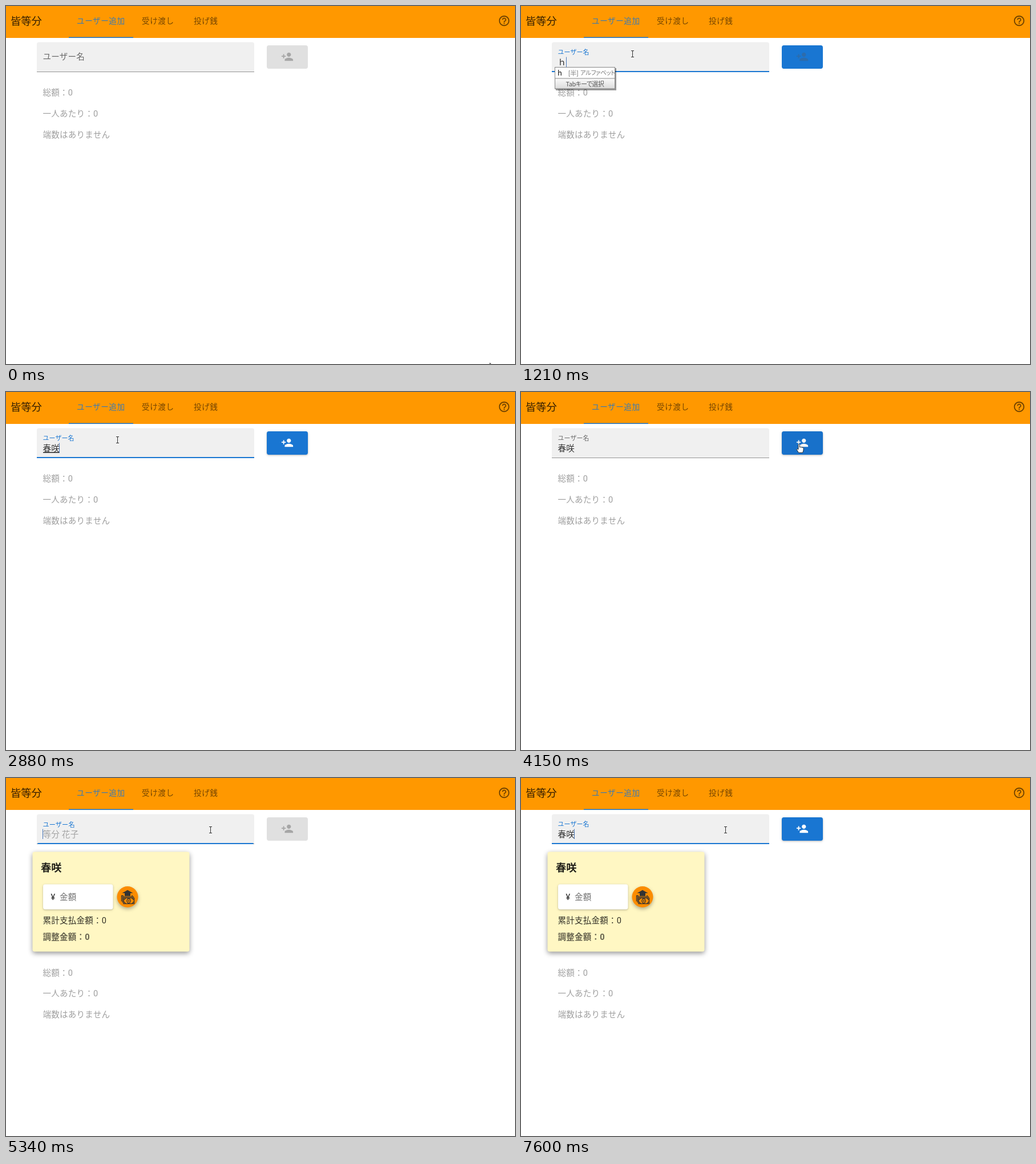
Write an HTML page that moves like this. It is 892 px wide and 628 px high and loops after 7990 ms.

```html
<!DOCTYPE html>
<html lang="ja">
<head>
<meta charset="utf-8">
<title>割り勘アプリ</title>
<style>
html, body { margin: 0; width: 100%; height: 100%; overflow: hidden; background: #fff; }
svg { display: block; width: 892px; height: 628px; }
text { font-family: Roboto, "Noto Sans CJK JP", "Noto Sans CJK", sans-serif; white-space: pre; }
.cjk { font-family: "Noto Sans CJK JP", "Noto Sans CJK", sans-serif; }
.tight { font-feature-settings: "palt"; letter-spacing: -.4px; }
.low { filter: drop-shadow(0 1.5px 1px rgba(0,0,0,.16)) drop-shadow(0 1px 2px rgba(0,0,0,.14)); }
.mid { filter: drop-shadow(0 3px 3px rgba(0,0,0,.3)); }
.high { filter: drop-shadow(0 3px 4px rgba(0,0,0,.42)); }
</style>
</head>
<body>
<svg id="stage" viewBox="0 0 892 628"></svg>
<script>
const LOOP = 7990;
const BLUE = '#1976d2';
const NAME = '春咲';
const FOCUS1 = 800, PRESS = 4150, ADD = 4380, ICON = 4540, FOCUS2 = 5130;

// Typing: time, text, suggestion popup, underline
const typing = [
  [0, ''],
  [1150, 'ｈ', 'letter'], [1340, 'は'], [1680, 'はｒ'], [1750, 'はる', 'two'],
  [2080, 'はるｓ', 'two'], [2150, 'はるさ', 'one'], [2550, 'はるさき', 'one'],
  [2880, NAME, '', true], [3150, NAME], [ADD, ''],
  [5530, 'ｈ', 'letter'], [5660, 'は'], [6140, 'はる', 'two'],
  [6540, 'はるｓ', 'two'], [6600, 'はるさ', 'one'], [6800, 'はるさｋ', 'one'],
  [6930, 'はるさき', 'one'], [7000, NAME, '', true], [7530, NAME]
];

// Pointer moves: start, end, from, to
const moves = [
  [60, 770, [848, 626], [195, 84]],
  [3520, 4010, [195, 84], [486, 91]],
  [4900, 5110, [486, 91], [358, 91]]
];

const text = (x, cy, str, size, fill, more = '') =>
  `<text x="${x}" y="${(cy + size * .38).toFixed(2)}" font-size="${size}" fill="${fill}" ${more}>${str}</text>`;
const body = (x, cy, str, fill, more = '') =>
  text(x, cy, str, 14.56, fill, `letter-spacing=".22" ${more}`);
const rect = (x, y, w, h, fill, more = '') =>
  `<rect x="${x}" y="${y}" width="${w}" height="${h}" fill="${fill}" ${more}/>`;
const tab = (x, str, fill) => text(x, 26, str, 13.6, fill, 'letter-spacing=".54"');

const HELP = 'M11 18h2v-2h-2v2zm1-16C6.48 2 2 6.48 2 12s4.48 10 10 10 10-4.48 10-10S17.52 2 12 2zm0 18c-4.41 0-8-3.59-8-8s3.59-8 8-8 8 3.59 8 8-3.59 8-8 8zm0-14c-2.21 0-4 1.79-4 4h2c0-1.1.9-2 2-2s2 .9 2 2c0 2-3 1.75-3 5h2c0-2.25 3-2.5 3-5 0-2.21-1.79-4-4-4z';
const PERSON = 'M15 12c2.21 0 4-1.79 4-4s-1.79-4-4-4-4 1.79-4 4 1.79 4 4 4zm-9-2V7H4v3H1v2h3v3h2v-3h3v-2H6zm9 4c-2.67 0-8 1.34-8 4v2h16v-2c0-2.66-5.33-4-8-4z';
const person = (id, fill) =>
  `<path id="${id}" d="${PERSON}" fill="${fill}" transform="translate(482 78) scale(.917)"/>`;
const button = (fill, more) => rect(457, 69, 72, 41, fill, `rx="3.7" ${more}`);

const money = `<g id="money" fill="none" stroke="#333" stroke-width="1.3">
  <path d="M203.500 202L213 196.500L222.500 202H218V207H208V202Z" fill="#333" stroke="none"/>
  <path d="M202.500 216.500V206.500H206M220 206.500H222M204.500 218.500V208.500H224"/>
  <rect x="206" y="210.500" width="18.500" height="10"/>
  <ellipse cx="215" cy="215.500" rx="3" ry="4"/>
  <path d="M215 213.500v4M206.500 214l3-3M224 217l-3 3M206.500 217l3 3M224 214l-3-3"/></g>`;

const stage = document.getElementById('stage');
stage.innerHTML = `
  <defs>
    <linearGradient id="foot" x2="0" y2="1"><stop stop-color="#fafafa"/><stop offset="1" stop-color="#dcdcdc"/></linearGradient>
    <clipPath id="clip">${button('#000', '')}</clipPath>
  </defs>
  ${rect(0, 0, 892, 56, '#ff9800')}
  ${text(8, 26, '皆等分', 18.3, 'rgba(0,0,0,.8)')}
  ${tab(124, 'ユーザー追加', 'rgba(25,118,210,.85)')}
  ${tab(238, '受け渡し', 'rgba(0,0,0,.54)')}
  ${tab(329, '投げ銭', 'rgba(0,0,0,.54)')}
  ${rect(110, 54.5, 113, 1.5, BLUE)}
  <path d="${HELP}" fill="rgba(0,0,0,.56)" transform="translate(862 15) scale(.917)"/>
  <path d="M54 115.500V67.200q0-3.700 3.700-3.700H431.300q3.700 0 3.700 3.700V115.500Z" fill="#f0f0f0"/>
  ${rect(54, 115, 381, 1, '#949494')}
  ${rect(54, 114, 381, 2, BLUE, 'id="bar"')}
  <text id="label" font-size="14.56" letter-spacing=".22">ユーザー名</text>
  ${body(64.5, 98, '等分 花子', '#000', 'id="hint"')}
  ${body(64.5, 98, '', 'rgba(0,0,0,.8)', 'id="value" class="cjk"')}
  ${rect(65, 105.3, 29, 1.5, '#222', 'id="under"')}
  ${rect(0, 89.5, 1, 17.5, '#4a78b8', 'id="caret"')}
  ${button('#e0e0e0', 'id="low" class="low"')}
  ${button('#e0e0e0', 'id="high" class="high"')}
  ${button('#e0e0e0', 'id="face"')}
  ${person('dim', '#000')}${person('lit', '#fff')}
  ${button('#000', 'id="shade"')}
  <g clip-path="url(#clip)"><circle id="ripple" cx="486" cy="91" fill="#fff"/></g>
  <g id="card">
    ${rect(46.5, 129.5, 275, 175, '#fff7c3', 'rx="3.7" class="high"')}
    ${text(61, 157, NAME, 18.3, 'rgba(0,0,0,.87)', 'font-weight="700"')}
    ${rect(65, 186.5, 122.5, 44, '#fff', 'rx="3.7" class="low"')}
    ${body(78.5, 208.8, '¥', 'rgba(0,0,0,.87)')}
    ${body(78, 208.8, '金額', 'rgba(0,0,0,.56)', 'id="amount"')}
    <circle cx="213" cy="208.500" r="18.500" fill="#fb8c00" class="mid"/>
    ${money}
    ${body(64.5, 249, '累計支払金額：0', 'rgba(0,0,0,.8)')}
    ${body(64.5, 278.5, '調整金額：0', 'rgba(0,0,0,.6)', 'font-weight="700"')}
  </g>
  <g id="totals">${['総額：0', '一人あたり：0', '端数はありません']
    .map((s, i) => body(64.5, 151.7 + 36.7 * i, s, 'rgba(0,0,0,.38)')).join('')}</g>
  <g id="popup"></g>
  <path id="arrow" d="M0 0V12L2.800 9.500L4.700 13.700L6.500 12.900L4.700 8.800H8.500Z" fill="#fff" stroke="#222" stroke-width=".9"/>
  <path id="beam" d="M-2 -5.500H3M-2 5.500H3M.5 -5.500V5.500" fill="none" stroke="#333"/>
  <path id="hand" d="M0 1.200q1.200-2.400 2.400 0V6q1.200-1 2.300 0q1.200-.8 2.300.4q1.700-.6 2 1V11l-1.400 4.500H.6L-3 9.700q.4-2 3 0Z" fill="#fff" stroke="#222" stroke-width=".9"/>`;

const el = {};
stage.querySelectorAll('[id]').forEach(n => el[n.id] = n);
const set = (id, attrs) => { for (const k in attrs) el[id].setAttribute(k, attrs[k]); };
const show = (id, on) => set(id, { display: on ? 'inline' : 'none' });

const unit = v => Math.max(0, Math.min(1, v));
const ramp = (t, from, ms) => unit((t - from) / ms);
const smooth = v => v * v * (3 - 2 * v);

// cubic-bezier(.25, .8, .25, 1)
function swift(v) {
  let lo = 0, hi = 1;
  for (let i = 0; i < 18; i++) {
    const s = (lo + hi) / 2;
    if (.75 * s * (1 - s) + s ** 3 < v) lo = s; else hi = s;
  }
  return 2.4 * lo * (1 - lo) ** 2 + 3 * lo * lo * (1 - lo) + lo ** 3;
}
const swing = (t, from, ms = 400) => swift(ramp(t, from, ms));

function popupMarkup(kind) {
  if (!kind) return '';
  const letter = kind === 'letter';
  const w = letter ? 106 : 100, rows = kind === 'two' ? 2 : 1, h = 20 + 19.5 * rows;
  const foot = 107.5 + 19.5 * rows;
  const row = (x, i, s, size, fill, more) => text(x, 117.5 + 19 * i, s, size, fill, more);
  const words = letter
    ? row(64, 0, 'h', 13, '#111', 'class="cjk"') + row(83, 0, '[半]', 11.5, '#888') +
      row(104, 0, 'アルファベット', 10.5, '#777', 'class="cjk tight"')
    : [NAME, NAME[0]].slice(0, rows).map((s, i) => row(64.5, i, s, 12.9, '#222')).join('');
  return rect(61, 109, w, h - .5, 'rgba(0,0,0,.4)') +
    rect(59.5, 107.5, w - 1, h - 2, '#fff', 'stroke="#888"') +
    rect(59.5, foot, w - 1, 107.5 + h - 2 - foot, 'url(#foot)', 'stroke="#888"') +
    text(59 + w / 2, foot + 9.4, 'Tabキーで選択', 10.8, '#555', 'class="cjk tight" text-anchor="middle"') + words;
}

function pointerAt(t) {
  let p = moves[0][2];
  for (const [a, b, from, to] of moves) {
    if (t < a) break;
    const k = smooth(ramp(t, a, b - a));
    p = from.map((v, i) => v + (to[i] - v) * k);
  }
  return p;
}

let lastPopup;
function draw(t) {
  const [, value, popup = '', underline] = typing.findLast(s => s[0] <= t);
  const since = t < FOCUS2 ? FOCUS1 : FOCUS2;
  const focused = t >= since && (t < PRESS || t >= FOCUS2);
  const added = t >= ADD;

  // Text field
  const up = t < ADD ? swing(t, FOCUS1) : t < FOCUS2 ? 1 - swing(t, ADD) : swing(t, FOCUS2);
  set('label', {
    transform: `translate(64.5 ${94 - 8.8 * up}) scale(${1 - .25 * up})`,
    fill: focused ? BLUE : 'rgba(0,0,0,.56)'
  });
  const bar = .5 + .5 * swing(t, since, 300);
  show('bar', focused);
  set('bar', { transform: `translate(${244.5 * (1 - bar)} 0) scale(${bar} 1)` });
  set('hint', { opacity: focused && !value ? .42 * swing(t, since + 100) : 0 });
  el.value.textContent = value;
  show('under', underline);
  show('caret', focused);
  set('caret', { x: Math.floor(64.5 + 14.7 * value.length) });
  if (popup !== lastPopup) el.popup.innerHTML = popupMarkup(lastPopup = popup);

  // Add button
  const [x, y] = pointerAt(t);
  const onButton = x > 457 && x < 529 && y > 69 && y < 110;
  const lit = smooth(ramp(t, 1150, 290)) * (1 - smooth(ramp(t, ADD - 40, 300))) + smooth(ramp(t, 5530, 270));
  const pressed = smooth(ramp(t, PRESS, 120)) * (1 - smooth(ramp(t, ADD + 20, 260)));
  const enabled = value !== '';
  set('face', { fill: enabled ? BLUE : '#e0e0e0' });
  set('low', { opacity: lit });
  set('high', { opacity: pressed });
  set('dim', { opacity: .26 * (1 - lit) });
  set('lit', { opacity: lit });
  set('shade', { opacity: Math.max(.12 * pressed, onButton && enabled ? .04 : 0) });
  set('ripple', {
    r: 50 * swing(t, PRESS, 300),
    opacity: t < PRESS ? 0 : .1 * (1 - ramp(t, ADD - 100, 120))
  });

  // Card and totals
  show('card', added);
  show('money', t >= ICON);
  set('amount', { x: t < ICON ? 78 : 94 });
  set('totals', { transform: `translate(0 ${added ? 189.5 : 0})` });

  // Pointer
  const shape = x > 54 && x < 435 && y > 63 && y < 116 ? 'beam' : onButton && enabled ? 'hand' : 'arrow';
  for (const id of ['arrow', 'beam', 'hand']) show(id, id === shape);
  set(shape, { transform: `translate(${Math.round(x)} ${Math.round(y)})` });
}

const start = performance.now();
function tick() {
  draw((performance.now() - start) % LOOP);
  requestAnimationFrame(tick);
}
tick();
</script>
</body>
</html>
```
